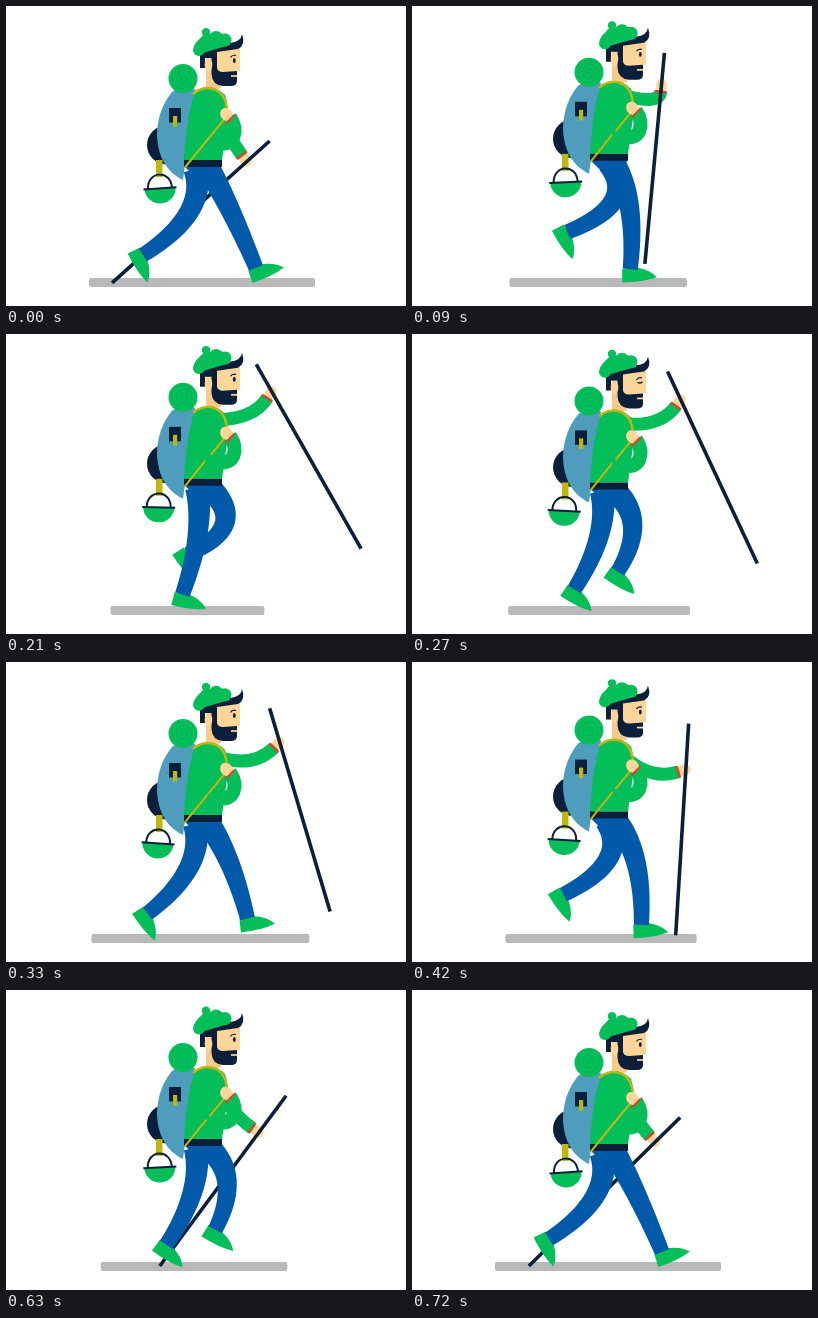
Animation of 400x300 px, one loop 750 ms. Source, as an HTML page with a canvas:

```html
<!DOCTYPE html>
<html lang="en">
<head>
<meta charset="utf-8">
<title>Walking hiker</title>
<style>
html, body { margin: 0; width: 100%; height: 100%; overflow: hidden; background: #fff; }
canvas { display: block; width: 400px; height: 300px; }
</style>
</head>
<body>
<canvas id="stage" width="400" height="300"></canvas>
<script>
const ctx = document.getElementById('stage').getContext('2d');
const { PI, sin, cos, min, max, hypot, atan2 } = Math;
const LOOP = 750, STEP = 30, STRIDE = 705, POLE_LENGTH = 212;
const GREEN = '#04be5a', BLUE = '#005aa9', NAVY = '#0b1f3a', PACK = '#4f9dbc';
const SKIN = '#ffd699', SHADE = '#fac987', RED = '#d5452b', OLIVE = '#bfb70e', GRAY = '#b9b9b9';

// One leg's cycle: knee, ankle, foot angle in degrees
const GAIT = [
  [225, 204, 250, 262, -22], // heel strike
  [227, 198, 230, 263, -6],  // load
  [199, 200, 188, 263, 0],   // stand
  [190, 202, 161, 255, 32],  // push off
  [189, 207, 137, 249, 60],  // trail
  [203, 198, 151, 233, 56],  // lift
  [225, 192, 168, 214, 62],  // pass
  [226, 191, 208, 239, 30]   // reach
];

const mix = (a, b, u) => a + (b - a) * u;
const smooth = u => u * u * (3 - 2 * u);
const wave = turns => cos(turns * 2 * PI);
const shifted = ([x, y], [dx, dy], k) => [x + dx * k, y + dy * k];
const toward = ([ax, ay], [bx, by]) => {
  const d = hypot(bx - ax, by - ay);
  return [(bx - ax) / d, (by - ay) / d];
};

function legAt(phase, bob) {
  const halves = phase * 2, h = halves % 1;
  const beat = 4 * (halves + 0.05 * sin(2 * PI * h) + 0.03 * sin(PI * h));
  const i = Math.floor(beat), u = beat - i;
  const pose = k => GAIT[(i + k + 7) % 8];
  const [kx, ky, ax, ay, angle] = pose(1).map((b, n) => {
    const a = pose(0)[n], c = pose(2)[n], d = pose(3)[n];
    return b + u / 2 * (c - a + u * (2 * a - 5 * b + 4 * c - d + u * (3 * (b - c) + d - a)));
  });
  return { hip: [mix(189, 203, (kx - 188) / 38), 163 + bob], knee: [kx, ky], ankle: [ax, ay], angle };
}

function poleAt(t) {
  const x = 267 - 18 * wave((t - 165) / LOOP);
  const y = t < 150 ? mix(135, 26, sin(PI / 2 * t / 150)) : mix(26, 135, ((t - 150) / 600) ** 1.4);
  let angle;
  if (t < 170) angle = mix(138, 59.5, smooth(t / 170)) * PI / 180;
  else if (t <= 420) angle = mix(59.5, 93.5, ((t - 170) / 250) ** 2) * PI / 180;
  else angle = PI - Math.asin(min(1, (276 - y) / POLE_LENGTH)); // tip rests on the ground
  return { top: [x, y], along: [cos(angle), sin(angle)] };
}

const fill = (color, path) => { ctx.fillStyle = color; ctx.fill(new Path2D(path)); };
function stroke(color, width, path) {
  ctx.strokeStyle = color;
  ctx.lineWidth = width;
  ctx.stroke(new Path2D(path));
}
function oval(color, x, y, rx, ry = rx, turn = 0) {
  ctx.fillStyle = color;
  ctx.beginPath();
  ctx.ellipse(x, y, rx, ry, turn, 0, PI * 2);
  ctx.fill();
}
function rect(color, x, y, w, h, radius = 0) {
  ctx.fillStyle = color;
  ctx.beginPath();
  ctx.roundRect(x, y, w, h, radius);
  ctx.fill();
}
function placed(x, y, degrees, draw) {
  ctx.save();
  ctx.translate(x, y);
  ctx.rotate(degrees * PI / 180);
  draw();
  ctx.restore();
}

function drawFoot({ ankle: [x, y], angle }) {
  placed(x, y, angle, () => fill(GREEN, 'M-8 -1 L-9 12.5 Q12 14 26 10 Q20 2 8 -1 Z'));
}

function drawLeg({ hip, knee, ankle }) {
  const span = [ankle[0] - hip[0], ankle[1] - hip[1]];
  const [p0, p1, p2, p3] = [hip, shifted(knee, span, -0.17), shifted(knee, span, 0.17), ankle];
  const left = [], right = [];
  for (let i = 0; i <= 24; i++) {
    const s = i / 24, r = 1 - s;
    const [x, y] = [0, 1].map(n =>
      r ** 3 * p0[n] + 3 * r * r * s * p1[n] + 3 * r * s * s * p2[n] + s ** 3 * p3[n]);
    const [dx, dy] = [0, 1].map(n =>
      r * r * (p1[n] - p0[n]) + 2 * r * s * (p2[n] - p1[n]) + s * s * (p3[n] - p2[n]));
    const k = mix(12, 7.5, s) / hypot(dx, dy);
    left.push([x - dy * k, y + dx * k]);
    right.unshift([x + dy * k, y - dx * k]);
  }
  fill(BLUE, 'M' + left.concat(right).join('L') + 'Z');
}

// The far arm follows the hand, which slides along the pole
function drawFarArm(t, bob, { top, along }) {
  const grip = 31 + 20 * max(0, sin(PI * (t - 300) / 450));
  const hand = shifted(top, along, grip), shoulder = [208, 95 + bob];
  const reach = toward(shoulder, hand);
  const elbow = shifted(shifted(shoulder, reach, 35), [-reach[1], reach[0]], 22 * reach[0] ** 2);
  const aim = toward(elbow, hand), wrist = shifted(hand, aim, -8), across = [-aim[1], aim[0]];
  oval(SKIN, ...shifted(hand, aim, -2), 7, 5.5, atan2(aim[1], aim[0]));
  stroke(GREEN, 13, `M${shoulder}Q${elbow} ${wrist}`);
  stroke(RED, 2.5, `M${shifted(wrist, across, -6)}L${shifted(wrist, across, 6)}`);
}

function drawRoll(x, y) {
  oval(GREEN, x, y, 14.5);
  let path = `M${x} ${y}`;
  for (let a = 0; a < 6 * PI; a += 0.2) path += `L${x + a * 0.7 * cos(a)} ${y + a * 0.7 * sin(a)}`;
  stroke('rgba(0, 110, 60, .15)', 1, path);
}

function drawPack(tilt) {
  oval(NAVY, 160.5, 139, 19.5);
  rect(OLIVE, 150, 154, 6.5, 17);
  placed(153, 168, tilt, () => {
    stroke(NAVY, 2, 'M-12 14.5 C-12 -4 12 -4 12 14.5');
    fill(GREEN, 'M-15.5 14.5 A15.5 15 0 0 0 15.5 14.5 Z');
    stroke(NAVY, 2, 'M-16.5 14.5 H16.5');
  });
  fill(PACK, 'M166 86 Q177 78 189 83 L177 174 C160 166 151 149 151 127 Q152 103 166 86 Z');
  drawRoll(177, 72.5);
  rect(NAVY, 163, 102, 12, 14.5);
  rect(OLIVE, 167, 110, 4.2, 10.5);
}

function drawHead(blink) {
  fill(SHADE, 'M200 50 H215 V82 Q207 85 200 81 Z');
  fill(SKIN, 'M204 42 H234 V65 H230 V76 H206 Z');
  fill(NAVY, 'M194 47 L214 39 L224 37 Q235 36 236 28 Q240 39 232 43 L211 46 V62 Q212 66 217 66 ' +
    'L231 65 V75 Q231 80 225 80 H217 Q206 79 205.5 68 V52 H199 V62 H194 Z');
  oval(SKIN, 202.5, 59, 3.8, 6.5);
  stroke(SKIN, 1.7, 'M225 70 H231');
  if (blink) stroke(NAVY, 1.4, 'M225.5 54 Q228 55.5 230.5 53.5');
  else oval(NAVY, 228.3, 54.5, 1.4, 2.5);
  stroke(NAVY, 1.2, 'M224.5 51.5 Q226 48.5 230 49.5');
}

function drawHat() {
  fill(GREEN, 'M190 49 L188 40 Q193 30 204 28 Q219 25 223 33 L224 39 Z');
  oval(GREEN, 193, 44, 6);
  oval(GREEN, 201, 35, 7);
  oval(GREEN, 210, 32, 7);
  oval(GREEN, 219, 34, 6.5);
  oval(GREEN, 200, 26.2, 4.2);
}

function drawTorso(lift) {
  fill(GREEN, 'M178 154 Q180.5 112 188 88 Q204 74 219 89 Q223 100 221 118 L216 154 Z');
  stroke(GREEN, 14, 'M212 137 C228 141 233 125 224 111');
  rect(NAVY, 178, 154, 38, 7);
  stroke(OLIVE, 2.4, 'M187 88 C197 78 219 79 221 104');
  // The strap parts in the middle as the body rises
  const gap = 3 * lift;
  stroke(OLIVE, 2, `M178.5 162 L${202 - gap} ${133 + gap} M${202 + gap} ${133 - gap} L221 110`);
  oval(SKIN, 220.5, 108.5, 6, 7, -0.7);
  stroke(RED, 2.2, 'M219.5 118 L228.5 109');
}

function render(now) {
  const t = Math.floor((now % LOOP) / STEP) * STEP;
  const stride = min(1, t / STRIDE);
  const lift = ((1 - wave(stride * 2)) / 2) ** 0.7, bob = -9.8 * lift;
  const legs = [legAt(stride, bob), legAt(stride + 0.5, bob)];
  const pole = poleAt(t);

  rect('#fff', 0, 0, 400, 300);
  const left = mix(83, 106, lift), right = mix(309, 255, lift);
  rect(GRAY, left, 272, right - left, 9, 2);

  drawFarArm(t, bob, pole);
  stroke(NAVY, 3.6, `M${pole.top}L${shifted(pole.top, pole.along, POLE_LENGTH)}`);
  legs.forEach(drawFoot);
  legs.forEach(drawLeg);
  placed(0, bob, 0, () => {
    fill(BLUE, 'M178 160 H216 L200 182 Z');
    drawPack(-4 * wave(stride));
    drawHead(t >= 240 && t <= 300);
    drawTorso(lift);
  });
  placed(0, bob * 1.1, 0, drawHat);
}

const start = performance.now();
function tick() {
  render(performance.now() - start);
  requestAnimationFrame(tick);
}
tick();
</script>
</body>
</html>
```
